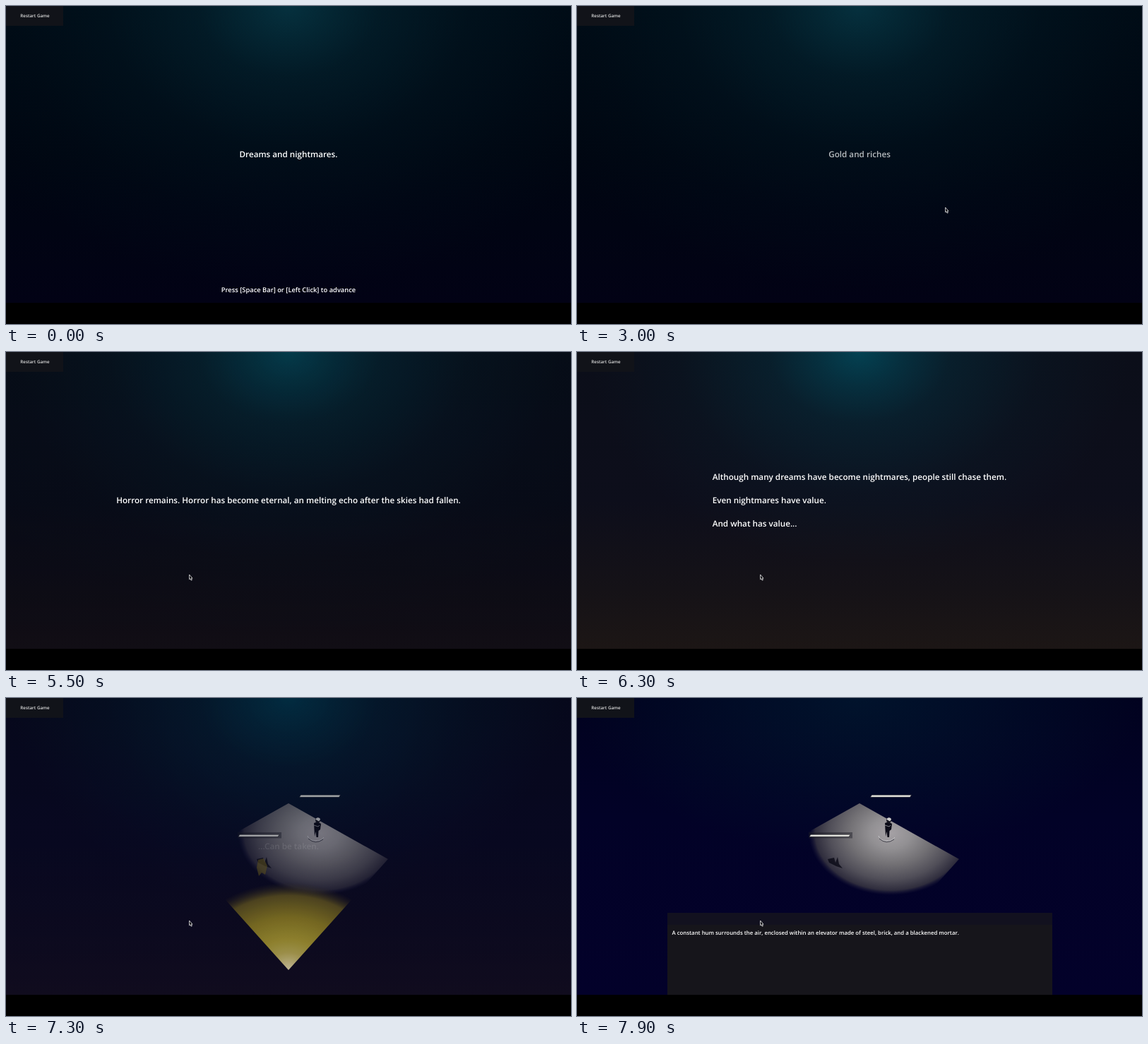
Write an HTML page that moves like this. It is 800 px wide and 450 px high and loops after 8 s.

```html
<!DOCTYPE html>
<html lang="en">
<head>
<meta charset="utf-8">
<title>Intro</title>
<style>
  html, body { margin: 0; width: 100%; height: 100%; overflow: hidden; background: #000; }
  svg { display: block; width: 800px; height: 450px; }
  text {
    font: 600 11.7px "Open Sans", "Noto Sans", sans-serif;
    fill: #fff; text-anchor: middle; text-rendering: geometricPrecision;
  }
  .left { text-anchor: start; }
  #prompt { font-size: 9.34px; }
  #button text { font-size: 6.28px; fill: #dcdcdc; }
  #dialog text { font-size: 7.8px; }
</style>
</head>
<body>
<svg viewBox="0 0 800 450" xmlns="http://www.w3.org/2000/svg">
  <defs>
    <linearGradient id="coldBase" x2="0" y2="1">
      <stop offset="0" stop-color="#000a14"/>
      <stop offset=".5" stop-color="#000611"/>
      <stop offset="1" stop-color="#020215"/>
    </linearGradient>
    <linearGradient id="warmBase" x2="0" y2="1">
      <stop offset="0" stop-color="#0b0e19"/>
      <stop offset=".5" stop-color="#0d0e1b"/>
      <stop offset=".8" stop-color="#151217"/>
      <stop offset="1" stop-color="#1c1615"/>
    </linearGradient>
    <linearGradient id="navyBase" x2="0" y2="1">
      <stop offset="0" stop-color="#01021f"/>
      <stop offset=".4" stop-color="#020227"/>
      <stop offset="1" stop-color="#03012a"/>
    </linearGradient>
    <radialGradient id="coldGlow" gradientUnits="userSpaceOnUse" r="1" gradientTransform="translate(400 0) scale(510 400)" cx="0" cy="0">
      <stop offset="0" stop-color="#063442" stop-opacity=".92"/>
      <stop offset=".12" stop-color="#063442" stop-opacity=".66"/>
      <stop offset=".25" stop-color="#063442" stop-opacity=".4"/>
      <stop offset=".5" stop-color="#063442" stop-opacity=".17"/>
      <stop offset=".75" stop-color="#063442" stop-opacity=".06"/>
      <stop offset="1" stop-color="#063442" stop-opacity="0"/>
    </radialGradient>
    <radialGradient id="warmGlow" gradientUnits="userSpaceOnUse" r="1" gradientTransform="translate(400 0) scale(510 400)" cx="0" cy="0">
      <stop offset="0" stop-color="#024a5c" stop-opacity=".85"/>
      <stop offset=".12" stop-color="#024a5c" stop-opacity=".55"/>
      <stop offset=".25" stop-color="#024a5c" stop-opacity=".28"/>
      <stop offset=".5" stop-color="#024a5c" stop-opacity=".08"/>
      <stop offset=".75" stop-color="#024a5c" stop-opacity="0"/>
    </radialGradient>
    <radialGradient id="navyGlow" gradientUnits="userSpaceOnUse" r="1" gradientTransform="translate(400 0) scale(400 220)" cx="0" cy="0">
      <stop offset="0" stop-color="#01132c"/>
      <stop offset="1" stop-color="#01132c" stop-opacity="0"/>
    </radialGradient>
    <radialGradient id="spot" gradientUnits="userSpaceOnUse" r="1" gradientTransform="translate(444 191) scale(116 88)" cx="0" cy="0">
      <stop offset="0" stop-color="#a5a1a5"/>
      <stop offset=".25" stop-color="#929093"/>
      <stop offset=".5" stop-color="#737175"/>
      <stop offset=".75" stop-color="#504e58"/>
      <stop offset=".92" stop-color="#2f2d3d"/>
      <stop offset="1" stop-color="#1a1838" stop-opacity="0"/>
    </radialGradient>
    <radialGradient id="lamp" gradientUnits="userSpaceOnUse" r="1" gradientTransform="translate(400 385) scale(155 124)" cx="0" cy="0">
      <stop offset="0" stop-color="#cbc09c"/>
      <stop offset=".2" stop-color="#a3964c"/>
      <stop offset=".35" stop-color="#94862e"/>
      <stop offset=".6" stop-color="#7a6c22"/>
      <stop offset=".85" stop-color="#50461f"/>
      <stop offset="1" stop-color="#2a2420" stop-opacity="0"/>
    </radialGradient>
    <clipPath id="floor"><path d="M400 149L541 228L400 385L259 228Z"/></clipPath>
  </defs>

  <g id="cold">
    <rect width="800" height="420" fill="url(#coldBase)"/>
    <rect width="800" height="420" fill="url(#coldGlow)"/>
  </g>
  <g id="warm">
    <rect width="800" height="420" fill="url(#warmBase)"/>
    <rect width="800" height="420" fill="url(#warmGlow)"/>
  </g>
  <g id="navy">
    <rect width="800" height="420" fill="url(#navyBase)"/>
    <rect width="800" height="420" fill="url(#navyGlow)"/>
  </g>
  <g id="scene">
    <rect x="250" y="130" width="300" height="160" fill="url(#spot)" clip-path="url(#floor)"/>
    <!-- standing figure -->
    <path d="M427 195A12 8.500 0 0 0 450 197" fill="none" stroke="#c4c4c8" stroke-width="1"/>
    <path d="M428 199Q438 208 449 200" fill="none" stroke="#2a2a34" stroke-width=".8"/>
    <path d="M436 177L441 175L446 178L445 186L442.500 188L442 197L439.500 197L438.500 189L437 196L436.500 187Z" fill="#0c0c18"/>
    <circle cx="441.500" cy="173" r="3.400" fill="#15151f"/>
    <path d="M438.500 172A3.300 3.300 0 0 1 445 172L443 174.500Z" fill="#cfcfcf"/>
    <path d="M436 180L442 182L444 180" fill="none" stroke="#8c8c92" stroke-width=".9"/>
    <!-- crouching shadow -->
    <path d="M355 228L364 226L366 233L369 225L371 235L376 241L367 238L357 233Z" fill="#050512" opacity=".75"/>
    <!-- health bars -->
    <path d="M328 190H390V198.500H328Z" fill="#1c1c24" opacity=".45"/>
    <path id="bar" d="M331 193.300H387L385 196.300H329Z" fill="#e8e8e2" stroke="#15151c" stroke-width=".5"/>
    <use href="#bar" x="86.500" y="-56"/>
  </g>
  <g id="yellow">
    <rect x="250" y="250" width="300" height="140" fill="url(#lamp)" clip-path="url(#floor)"/>
    <path d="M357 229L365 227L370 238L367 250L362 247L358 252L355 240Z" fill="#5a4e1c" opacity=".6"/>
  </g>
  <g id="button">
    <rect width="81" height="28" fill="#111319"/>
    <text x="41" y="16.300">Restart Game</text>
  </g>
  <g id="lines"></g>
  <text id="prompt" x="400" y="404.900">Press [Space Bar] or [Left Click] to advance</text>
  <g id="dialog">
    <rect x="128" y="304" width="545" height="116" fill="#16151b"/>
    <rect x="128" y="304" width="545" height="17" fill="#12111f"/>
    <text class="left" x="134.500" y="334.500">A constant hum surrounds the air, enclosed within an elevator made of steel, brick, and a blackened mortar.</text>
  </g>
  <path id="cursor" d="M.6 .5V7.300L2 6.200L3.100 8.600L4.300 8.100L3.300 5.700H5Z" fill="#0a0a10" stroke="#f2f2f2" stroke-width=".8"/>
</svg>
<script>
const LOOP = 8000, STEP = 100, FADE = 250;
const get = id => document.getElementById(id);

// Each line of the story with the times its fade-in and fade-out begin
const story = [
  { from: -1000, to: 2200, rows: ["Dreams and nightmares."] },
  { from: 2450, to: 2930, rows: ["Gold and riches"] },
  { from: 3210, to: 3640, rows: ["Horrors and the unimaginable nightmares."] },
  { from: 3850, to: 4800, rows: ["Both have become common place."] },
  { from: 5050, to: 5690, rows: ["Horror remains. Horror has become eternal, an melting echo after the skies had fallen."] },
  { from: 5940, to: 6320, left: 191.7, rows: [
    "Although many dreams have become nightmares, people still chase them.",
    "Even nightmares have value.",
    "And what has value..."] },
  { from: 6580, to: 7075, rows: ["...Can be taken."] }
];

// Rows of [time, value, ...]
const tracks = {
  warm: [[5300, 0], [5500, .6], [6300, 1]],
  navy: [[7100, 0], [7300, .45], [7600, .9], [7900, 1]],
  scene: [[7100, 0], [7200, .3], [7300, .7], [7600, .95], [7900, 1]],
  yellow: [[7100, 0], [7200, .5], [7300, .95], [7700, 0]],
  prompt: [[2200, 1], [2700, 0]],
  dialog: [[7450, 0], [7750, 1]]
};
const path = [
  [1400, 206, 389], [1500, 327, 310], [1600, 327, 310], [2100, 521, 284.5],
  [3600, 521, 284.5], [4100, 215, 408], [4400, 215, 408], [4500, 199.5, 416],
  [4600, 200, 418], [5100, 259, 314.5]
];

function sample(rows, t) {
  if (t <= rows[0][0]) return rows[0].slice(1);
  for (let i = 1; i < rows.length; i++) {
    const [a, b] = [rows[i - 1], rows[i]];
    if (t <= b[0]) {
      const k = (t - a[0]) / (b[0] - a[0]);
      return a.slice(1).map((v, j) => v + (b[j + 1] - v) * k);
    }
  }
  return rows[rows.length - 1].slice(1);
}

for (const line of story) {
  line.node = document.createElementNS("http://www.w3.org/2000/svg", "g");
  line.rows.forEach((row, i) => {
    const text = document.createElementNS("http://www.w3.org/2000/svg", "text");
    text.textContent = row;
    text.setAttribute("x", line.left || 400);
    text.setAttribute("y", 214.2 + (i - (line.rows.length - 1) / 2) * 32.8);
    if (line.left) text.setAttribute("class", "left");
    line.node.append(text);
  });
  get("lines").append(line.node);
}

const clamp = v => Math.max(0, Math.min(1, v));

function draw(t) {
  for (const line of story) {
    const alpha = Math.min(clamp((t - line.from) / FADE), clamp(1 - (t - line.to) / FADE));
    line.node.setAttribute("opacity", alpha);
  }
  for (const id in tracks) get(id).setAttribute("opacity", sample(tracks[id], t)[0]);
  const cursor = get("cursor");
  cursor.setAttribute("opacity", t < path[0][0] ? 0 : 1);
  cursor.setAttribute("transform", `translate(${sample(path, t).join(" ")})`);
}

function tick() {
  const t = performance.now() % LOOP;
  draw(Math.floor(t / STEP) * STEP);
  requestAnimationFrame(tick);
}
tick();
</script>
</body>
</html>
```
